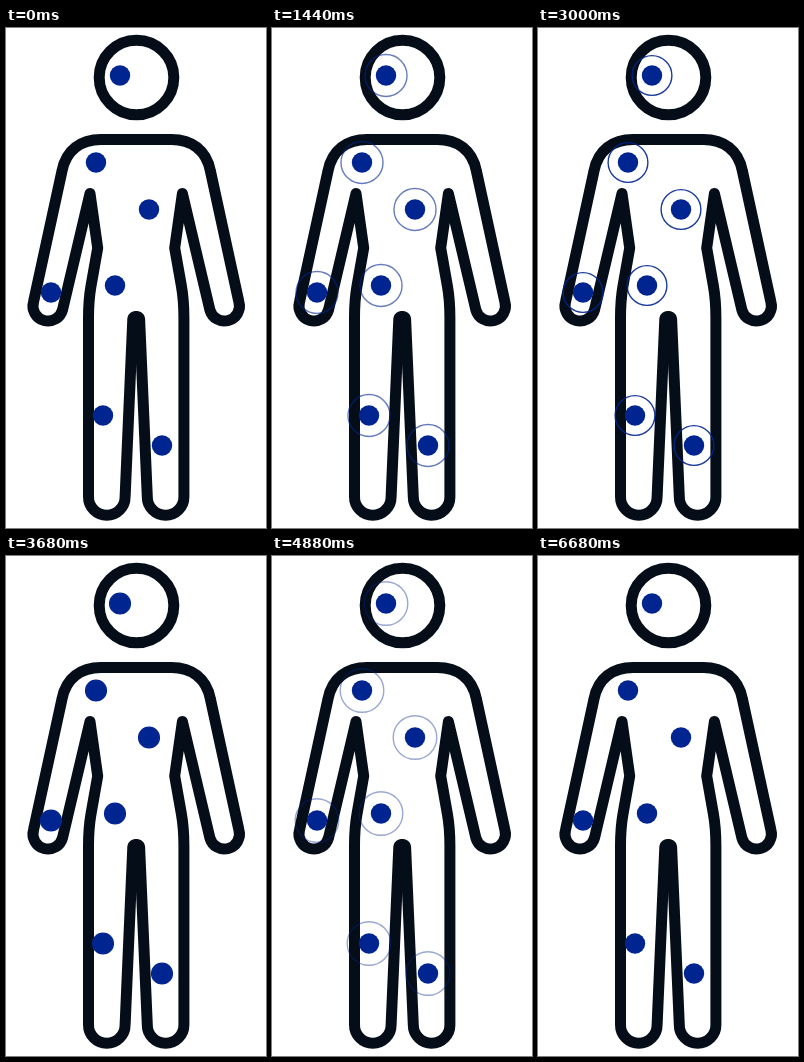
Animation, 260 px wide and 500 px high, one loop 7 s. Source, as an HTML page with a canvas:

```html
<!DOCTYPE html>
<html lang="en">
<head>
<meta charset="utf-8">
<title>Pulsing body points</title>
<style>
  html, body { margin: 0; width: 100%; height: 100%; overflow: hidden; background: #fff; }
  canvas { display: block; width: 260px; height: 500px; }
</style>
</head>
<body>
<canvas id="stage"></canvas>
<script>
const W = 260, H = 500, LOOP = 7000, STEP = 40;
const INK = '#050d18', BLUE = '#002591';
const AXIS = 130.2;
const PULSE = 1400, STARTS = [280, 1960, 3640, 5280];
const DOT_R = 10.2;
const POINTS = [
  [114, 47.5], [90, 134.5], [143, 181.5], [109, 257.5],
  [45, 264.5], [97, 387.5], [156, 417.5]
];

// Left half of the figure, from the neck down to the crotch
const half = new Path2D(
  `M${AXIS} 111.5 H95 C75 111.5 60 122 56 143 L27.5 274` +
  'A15.04 15.04 0 0 0 56.5 282 L84 165.5 L91.7 220 L85 258' +
  'Q82.5 272 82.5 290 V469 A18.3 18.3 0 0 0 119.1 469' +
  `L126.8 291 Q127.4 288.5 ${AXIS} 288.5`
);

const canvas = document.getElementById('stage');
const ctx = canvas.getContext('2d');
const dpr = window.devicePixelRatio || 1;
canvas.width = W * dpr;
canvas.height = H * dpr;

function circle(x, y, r) {
  ctx.beginPath();
  ctx.arc(x, y, r, 0, Math.PI * 2);
}

function drawFigure() {
  ctx.strokeStyle = INK;
  ctx.lineWidth = 11;
  ctx.lineJoin = ctx.lineCap = 'round';
  circle(130.5, 49.5, 37.3);
  ctx.stroke();
  ctx.stroke(half);
  ctx.save();
  ctx.translate(2 * AXIS, 0);
  ctx.scale(-1, 1);
  ctx.stroke(half);
  ctx.restore();
}

function drawRings(age) {
  ctx.strokeStyle = BLUE;
  ctx.lineWidth = 1.4;
  ctx.globalAlpha = Math.min(1, (PULSE - age) / 400);
  for (const [x, y] of POINTS) {
    circle(x, y, 10 + 0.0095 * age);
    ctx.stroke();
  }
  ctx.globalAlpha = 1;
}

function drawDots() {
  ctx.fillStyle = BLUE;
  for (const [x, y] of POINTS) {
    circle(x, y, DOT_R);
    ctx.fill();
  }
}

function draw(now) {
  const t = Math.floor((now % LOOP) / STEP) * STEP;
  ctx.setTransform(dpr, 0, 0, dpr, 0, 0);
  ctx.fillStyle = '#fff';
  ctx.fillRect(0, 0, W, H);
  drawFigure();
  const start = STARTS.find(s => t >= s && t < s + PULSE);
  if (start !== undefined) drawRings(t - start);
  drawDots();
}

let origin;
function tick(now) {
  origin ??= now;
  draw(now - origin);
  requestAnimationFrame(tick);
}
draw(0);
requestAnimationFrame(tick);
</script>
</body>
</html>
```
